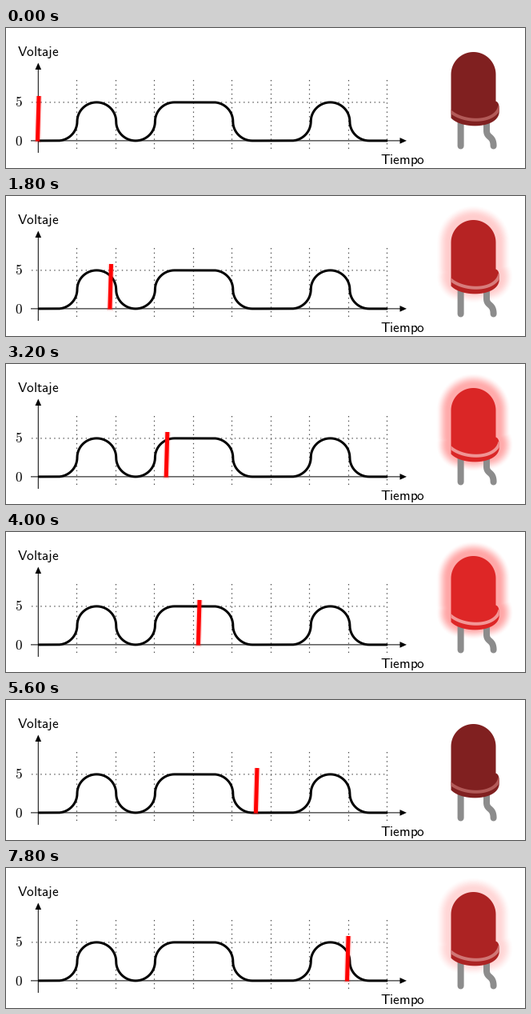
These frames come from a looping animation (649x175 px, 8 s). A matplotlib script:

```python
import numpy as np
import matplotlib.pyplot as plt
from matplotlib.animation import FuncAnimation
from matplotlib.patches import Polygon

W, H, DPI = 649, 175, 64
FRAMES, STEP = 40, 200
PT = 72 / DPI  # points per pixel
X0, CELL = 40.3, 48.7
Y_LOW, Y_HIGH = 140.9, 92.9
BITS = np.array([0, 1, 0, 1, 1, 0, 0, 1, 0])

plt.rcParams["mathtext.fontset"] = "cm"
fig = plt.figure(figsize=(W / DPI, H / DPI), dpi=DPI, facecolor="white")
ax = fig.add_axes([0, 0, 1, 1])
ax.set_xlim(0, W)
ax.set_ylim(H, 0)
ax.axis("off")


def line(xs, ys, width, color="black", **kw):
    kw.setdefault("solid_capstyle", "butt")
    return ax.plot(xs, ys, color=color, lw=width * PT, snap=False, **kw)[0]


def label(x, y, word):
    ax.text(x, y, rf"$\mathsf{{{word}}}$", fontsize=17.2 * PT, va="baseline")


def bezier(*points):
    p0, p1, p2, p3 = np.array(points)
    t = np.linspace(0, 1, 30)[:, None]
    s = 1 - t
    return s**3 * p0 + 3 * s * s * t * p1 + 3 * s * t * t * p2 + t**3 * p3


def signal(u, ease):
    """Level at u cells; each step between bits is centred on a cell border."""
    n = np.clip(np.round(u).astype(int), 0, len(BITS))
    before, after = BITS[np.maximum(n - 1, 0)], BITS[np.minimum(n, len(BITS) - 1)]
    return before + (after - before) * ease(u - n + 0.5)


def arcs(t):
    """Two quarter circles joined into an S."""
    d = np.minimum(t, 1 - t)
    bow = np.sqrt(np.maximum(0.25 - d * d, 0))
    return 0.5 + np.where(t < 0.5, -bow, bow)


def ramp(t):
    return np.clip(1.2 * t, 0, 1)


def draw_chart():
    dots = dict(color="0.3", ls=(0, (1.2, 3.5)), dash_capstyle="butt")
    for i in range(1, 10):
        x = round(40 + 48.45 * i) + 0.5
        line([x, x], [65, 152], 1.2, **dots)
    line([32, 477], [Y_HIGH, Y_HIGH], 1.2, **dots)

    x, y = 40.3, Y_LOW
    line([31, 495], [y, y], 1)
    line([x, x], [156, 50], 1)
    ax.add_patch(Polygon([(501, y), (492.5, y - 3.8), (492.5, y + 3.8)], fc="black", lw=0))
    ax.add_patch(Polygon([(x, 43.5), (x - 3.8, 52), (x + 3.8, 52)], fc="black", lw=0))

    u = np.linspace(0, 8.97, 6000)
    line(X0 + CELL * u, Y_LOW + (Y_HIGH - Y_LOW) * signal(u, arcs), 3,
         solid_joinstyle="round")

    label(14.2, 35.5, "Voltaje")
    label(467.6, 169.8, "Tiempo")
    label(11, 98.5, "5")
    label(11, 146.8, "0")


def capsule(px, py, a, b, r):
    """Distance from points to a rounded bar between a and b."""
    a, d = np.array(a), np.subtract(b, a)
    t = np.clip(((px - a[0]) * d[0] + (py - a[1]) * d[1]) / (d @ d), 0, 1)
    return np.hypot(px - a[0] - t * d[0], py - a[1] - t * d[1]) - r


def draw_halo():
    left, right, top, bottom = 530, 642, 6, 148
    px, py = np.meshgrid(np.arange(left, right) + 0.5, np.arange(top, bottom) + 0.5)
    dist = np.minimum(capsule(px, py, (584.5, 58), (584.5, 88), 28),
                      capsule(px, py, (569.5, 101), (603, 101), 13))
    s = np.clip((dist - 4) / 15, 0, 1)
    img = np.ones(px.shape + (4,)) * [1, 0.2, 0.2, 1]
    img[..., 3] = 0.43 * (1 - s * s * (3 - 2 * s))
    return ax.imshow(img, extent=(left, right, bottom, top), aspect="auto",
                     interpolation="nearest", zorder=2.1)


def draw_led():
    bent = bezier((601, 128), (601, 138), (609.6, 134), (609.6, 147.5))
    for leg in (np.array([(568.6, 116), (568.6, 147.5)]),
                np.vstack([(601, 116), bent])):
        line(*leg.T, 8, "#8c8c8c", solid_capstyle="round",
             solid_joinstyle="round", zorder=2.2)

    a = np.linspace(np.pi, 2 * np.pi, 40)
    dome = np.c_[584.5 + 28 * np.cos(a), 58 + 28 * np.sin(a)]
    shoulder = bezier((612.5, 91.5), (616, 93), (617, 96), (616.7, 106))
    bottom = bezier((616.7, 106), (614, 126), (570, 127), (556.5, 112.5))
    body = ax.add_patch(Polygon(np.vstack([dome, shoulder, bottom]), lw=0, zorder=3))

    rim = bezier((555, 103.5), (570, 118.5), (612, 120.5), (617.5, 97.5))
    stripe = line(*rim.T, 4, zorder=4)
    stripe.set_clip_path(body)
    return body, stripe


def mix(c0, c1, t):
    return tuple((np.array(c0) * (1 - t) + np.array(c1) * t) / 255)


draw_chart()
halo = draw_halo()
body, stripe = draw_led()
bar_soft = line([], [], 8, "red", alpha=0.15, zorder=5)
bar = line([], [], 5, "red", zorder=6)


def update(frame):
    # the sweep is steady but holds for one tick
    x = X0 + np.interp(frame, [0, 22, 23, 39], [0, 221, 221, 387])
    bar.set_data([x - 0.8, x + 0.8], [141.5, 85])
    bar_soft.set_data([x - 0.8, x + 0.8], [143.5, 85])

    b = float(signal((x - X0) / CELL, ramp))
    halo.set_alpha(b)
    body.set_facecolor(mix((128, 32, 32), (222, 38, 38), b))
    stripe.set_color(mix((178, 90, 88), (243, 150, 150), b))
    return bar, bar_soft, halo, body, stripe


anim = FuncAnimation(fig, update, frames=FRAMES, interval=STEP, repeat=True,
                     repeat_delay=0, blit=False)
plt.show()
```
